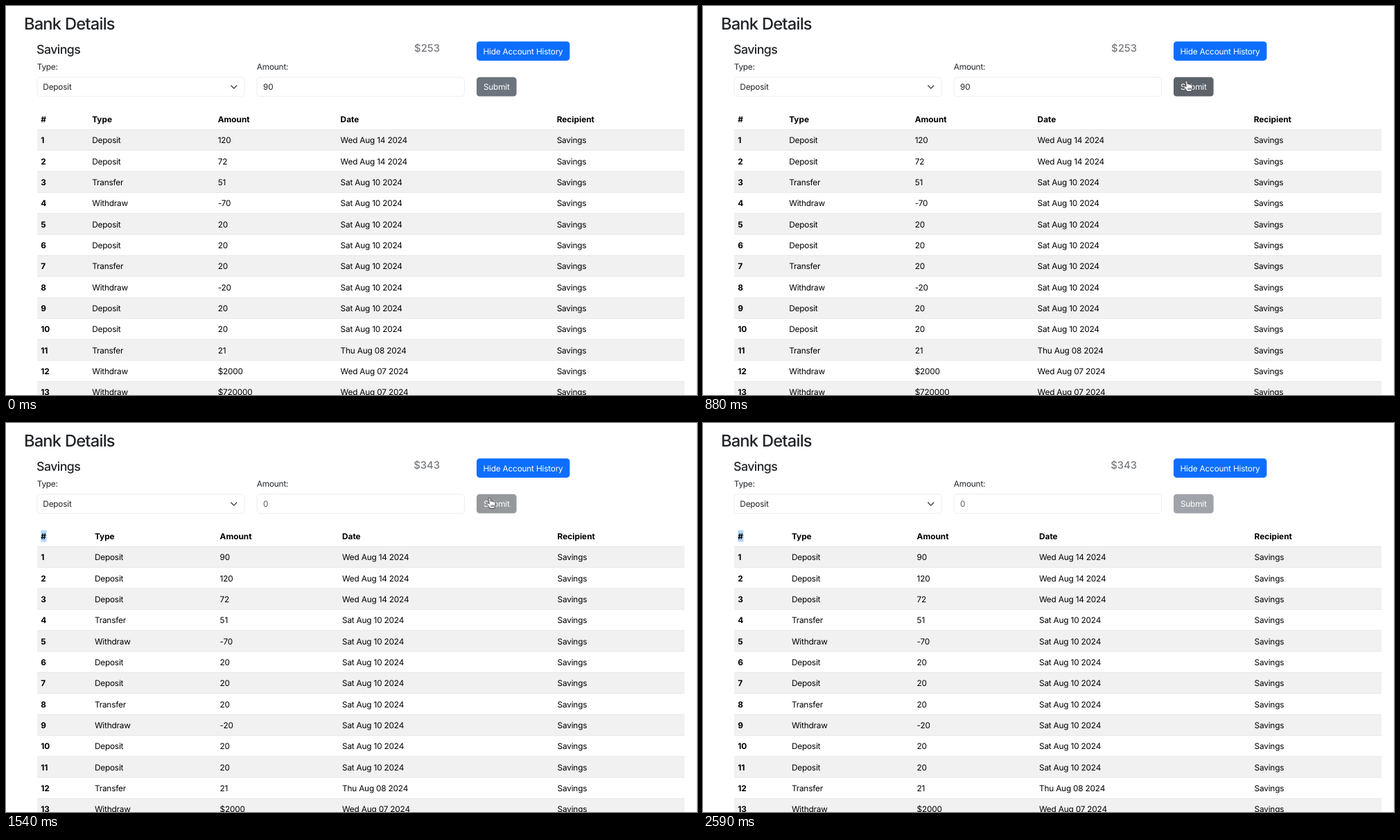
An HTML page for the animation above (2.69 s loop, 997 by 562 pixels).

```html
<!DOCTYPE html>
<html lang="en">
<head>
<meta charset="utf-8">
<title>Bank Details</title>
<style>
  html, body { margin: 0; width: 100%; height: 100%; overflow: hidden; background: #fff; }
  svg { display: block; width: 100vw; height: 100vh; }
  text {
    font: 400 11.84px Inter, "Liberation Sans", sans-serif;
    font-optical-sizing: none;
    letter-spacing: -.017em;
    text-rendering: geometricPrecision;
    fill: #000;
  }
  .bold { font-weight: 700; letter-spacing: 0; }
  .title { font-size: 23.68px; font-weight: 500; letter-spacing: -.032em; fill: #212529; }
  .sub { font-size: 17.76px; font-weight: 500; letter-spacing: -.032em; fill: #212529; }
  .balance { font-size: 14.8px; font-weight: 500; letter-spacing: 0; fill: #76797d; text-anchor: end; }
  .label, .value { fill: #212529; }
  .muted { fill: #5a5d61; }
  .btn { fill: #fff; text-anchor: middle; }
  .box { fill: #fff; stroke: #e6e8ea; stroke-width: .8; }

  .before, .after, #submit, #cursor, #arrow, #hand {
    animation: 2690ms step-end infinite;
  }
  .before { animation-name: before; }
  .after { animation-name: after; }
  #submit { animation-name: submit; }
  #cursor { animation-name: move; }
  #arrow { animation-name: arrow; }
  #hand { animation-name: hand; }

  @keyframes before { 0% { opacity: 1 } 57.24%, 100% { opacity: 0 } }
  @keyframes after { 0% { opacity: 0 } 57.24%, 100% { opacity: 1 } }
  @keyframes submit {
    0% { fill: #6c757d }
    31.22% { fill: #5c636a }
    57.24% { fill: #96999c }
    60.96%, 100% { fill: #a0a3a9 }
  }
  @keyframes move {
    0% { transform: translate(640px, 570px) }
    15.01% { transform: translate(652px, 430px) }
    18.65% { transform: translate(672px, 265px) }
    22.29% { transform: translate(686px, 160px) }
    25.64% { transform: translate(690.5px, 121.5px) }
    31.22% { transform: translate(697.5px, 108px) }
    68.02% { transform: translate(690px, 150px) }
    71.74% { transform: translate(644px, 262px) }
    74.71% { transform: translate(612.5px, 335px) }
    78.06%, 100% { transform: translate(606px, 352px) }
  }
  @keyframes arrow {
    0% { opacity: 0 }
    15.01% { opacity: 1 }
    25.64% { opacity: 0 }
    68.02% { opacity: 1 }
    82.89%, 100% { opacity: 0 }
  }
  @keyframes hand {
    0% { opacity: 0 }
    25.64% { opacity: 1 }
    68.02%, 100% { opacity: 0 }
  }
</style>
</head>
<body>
<svg viewBox="0 0 997 562" preserveAspectRatio="none">
  <path d="M996.5 0V562" stroke="#ececec"/>

  <text class="title" x="25.9" y="34.2">Bank Details</text>
  <text class="sub" x="44" y="68.5">Savings</text>
  <text class="balance before" x="626" y="66">$253</text>
  <text class="balance after" x="626" y="66">$343</text>

  <rect x="679" y="51.3" width="134.4" height="27.6" rx="4.4" fill="#0d6efd"/>
  <text class="btn" x="746" y="69.8">Hide Account History</text>

  <text class="label" x="44.7" y="92.3">Type:</text>
  <rect class="box" x="45" y="103" width="299" height="27.6" rx="4.4"/>
  <text class="value" x="53.3" y="121.4">Deposit</text>
  <path d="M324.8 115L328.8 119.1L332.8 115" fill="none" stroke="#343a40" stroke-width="1.3" stroke-linecap="round" stroke-linejoin="round"/>

  <text class="label" x="361.8" y="92.3">Amount:</text>
  <rect class="box" x="362" y="103" width="299.4" height="27.6" rx="4.4"/>
  <text class="value before" x="371" y="121.4">90</text>
  <text class="value muted after" x="371" y="121.4">0</text>

  <rect id="submit" x="679" y="102.8" width="57.6" height="27.8" rx="4.4"/>
  <text class="btn" x="707.8" y="121.4">Submit</text>

  <g id="stripes"></g>
  <g id="old" class="before"></g>
  <g id="new" class="after">
    <rect x="50.3" y="154.8" width="8.2" height="17" fill="#b4d7fb"/>
  </g>

  <g id="cursor">
    <path id="arrow" d="M0 0V11.6L2.6 9.2L4.6 13.8L6.8 12.8L4.8 8.4H8.2Z" fill="#000" stroke="#fff" stroke-width=".9" stroke-linejoin="round"/>
    <path id="hand" d="M-1.3 1C-1.3 -.6 1.2 -.6 1.4 1L2 5.2C2.4 4.2 4 4.3 4.3 5.5C4.9 4.7 6.3 5 6.5 6.2C7.3 5.6 8.6 6.1 8.6 7.4V10.6C8.6 12.6 7.5 13.4 7.3 15.4H.6C.2 13.4 -2.4 11.2 -3.7 9C-4.3 7.7 -2.7 6.7 -1.6 7.8L-.3 9.1ZM2.6 10.4V13.2M4.5 10.4V13.2M6.3 10.4V13.2" fill="#fff" stroke="#2b2d30" stroke-width=".9" stroke-linejoin="round"/>
  </g>
</svg>
<script>
  const TOP = 178.3, ROW = 30.35, COUNT = 13;
  const kinds = { D: 'Deposit', T: 'Transfer', W: 'Withdraw' };
  const days = { a: 'Wed Aug 14 2024', b: 'Sat Aug 10 2024', c: 'Thu Aug 08 2024', d: 'Wed Aug 07 2024' };
  const history = ('Da90 Da120 Da72 Tb51 Wb-70 Db20 Db20 Tb20 Wb-20 Db20 Db20 ' +
    'Tc21 Wd$2000 Wd$720000').split(' ')
    .map(s => [kinds[s[0]], s.slice(2), days[s[1]], 'Savings']);

  function add(parent, tag, attrs, content = '') {
    const el = document.createElementNS('http://www.w3.org/2000/svg', tag);
    for (const name in attrs) el.setAttribute(name, attrs[name]);
    el.textContent = content;
    parent.append(el);
  }

  function drawTable(id, columns, rows) {
    const group = document.getElementById(id);
    const line = (cells, index) => cells.forEach((cell, i) => add(group, 'text', {
      x: columns[i],
      y: 198.2 + index * ROW,
      class: index < 0 || i === 0 ? 'bold' : ''
    }, cell));
    line(['#', 'Type', 'Amount', 'Date', 'Recipient'], -1);
    rows.slice(0, COUNT).forEach((row, i) => line([i + 1, ...row], i));
  }

  const stripes = document.getElementById('stripes');
  for (let i = 0; i < COUNT; i++) {
    const y = TOP + i * ROW;
    if (i % 2 === 0) add(stripes, 'rect', { x: 45, y, width: 934, height: ROW, fill: '#f1f1f1' });
    add(stripes, 'rect', { x: 45, y: y - .4, width: 934, height: .75, fill: '#e0e3e6' });
  }
  drawTable('old', [50.2, 124.2, 305.7, 482.6, 794.7], history.slice(1));
  drawTable('new', [50.2, 127.9, 308.6, 485, 795.6], history);
</script>
</body>
</html>
```
